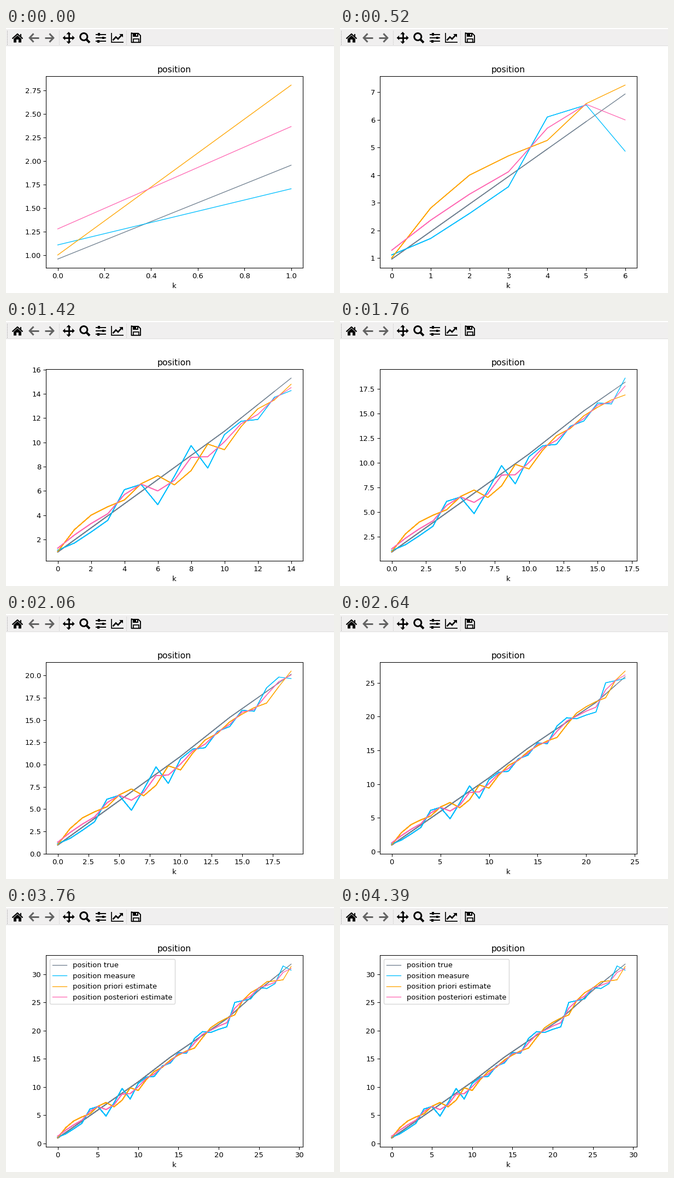
Recreate the animation shown at these times as a matplotlib script. Size 600 by 484 pixels, loop 4.79 s.

```python
import matplotlib.pyplot as plt
import numpy as np
from matplotlib.animation import FuncAnimation
from matplotlib.patches import Circle, Polygon, Rectangle

W, H, DPI = 600, 484, 100
LOOP_MS, FRAMES = 4790, 160
FRAMES_PER_STEP, HEAD_START, LEGEND_FRAME = 3.85, 3.75, 110
SCALE = 0.948  # the plot window is shown slightly reduced
LAST = 29

TRACK = {0: 0.96, 10: 10.92, 14: 15.3, 21: 22.08, 25: 27.15, 29: 31.78}
SPEED = {0: 1.526, 1: 1.634, 4: 0.89, 6: 0.5, 8: 1.1, 9: 0.58, 10: 1.25,
         14: 1.15, 15: 0.5, 19: 1.4, 24: 1.4, 27: 0.45, 28: 1.05}
SENSOR_NOISE = [0.15, -0.25, -0.34, -0.37, 1.16, 0.6, -2.07, -0.72, 0.81,
                -2.04, -0.28, -0.27, -1.22, -0.48, -1.03, -0.17, -1.25, 0.41,
                0.65, -0.48, -0.89, -1.42, 1.65, 0.69, -0.24, 0.45, -0.84,
                -1.14, 0.83, -1.08]


def through(points):
    return np.interp(range(LAST + 1), list(points), list(points.values()))


def estimate(measured, speed):
    """Predict each position from the last one, then correct it."""
    priori, posteriori = [1.003], [1.28]
    for k in range(1, LAST + 1):
        gain = 0.53 - 0.13 / k ** 2
        guess = posteriori[-1] + speed[k - 1]
        priori.append(guess)
        posteriori.append(guess + gain * (measured[k] - guess))
    return priori, posteriori


true = through(TRACK)
measured = true + SENSOR_NOISE
priori, posteriori = estimate(measured, through(SPEED))
SERIES = [
    ("position true", "slategray", true),
    ("position measure", "deepskyblue", measured),
    ("position priori estimate", "orange", priori),
    ("position posteriori estimate", "hotpink", posteriori),
]
VALUES = np.array([data for _, _, data in SERIES])

plt.rcParams.update({
    "toolbar": "None",
    "font.family": "DejaVu Sans",
    "font.size": 9.42,
    "axes.linewidth": 0.8 * SCALE,
    "axes.titlepad": 6 * SCALE,
    "axes.labelpad": 4 * SCALE,
    "lines.linewidth": SCALE,
    "patch.linewidth": SCALE,
})
for axis in ("xtick", "ytick"):
    plt.rcParams.update({
        f"{axis}.major.size": 3.5 * SCALE,
        f"{axis}.major.width": 0.8 * SCALE,
        f"{axis}.major.pad": 3.5 * SCALE,
    })

fig = plt.figure(figsize=(W / DPI, H / DPI), dpi=DPI, facecolor="white")

# Toolbar, drawn in pixel coordinates with y pointing down
bar = fig.add_axes([0, 0, 1, 1])
bar.set(xlim=(0, W), ylim=(H, 0))
bar.axis("off")
INK, FADED, PANEL = "black", "#626262", "#f0efef"


def stroke(points, width, color=INK, join="miter"):
    xs, ys = zip(*points)
    bar.plot(xs, ys, color=color, lw=width * 72 / DPI,
             solid_capstyle="butt", solid_joinstyle=join)


def fill(points, color=INK):
    bar.add_patch(Polygon(points, fc=color, lw=0))


def box(x0, y0, x1, y1, color=INK):
    bar.add_patch(Rectangle((x0, y0), x1 - x0, y1 - y0, fc=color, lw=0))


def dotted(x, color):
    for y in range(5, 31, 3):
        box(x, y, x + 1, y + 1.5, color)


def home_icon():
    stroke([(11.5, 19.5), (21, 11), (30.5, 19.5)], 2.2)
    box(25.5, 10.5, 28.3, 16)
    fill([(14, 19.8), (21, 13.6), (28, 19.8), (28, 26.5), (23, 26.5),
          (23, 21), (19, 21), (19, 26.5), (14, 26.5)])


def arrow_icon(tip, direction):
    stroke([(tip + direction * 9.5, 10.3), (tip + direction * 2.2, 18),
            (tip + direction * 9.5, 25.7)], 3, FADED)
    stroke([(tip + direction * 2.5, 18), (tip + direction * 18.5, 18)],
           3, FADED)


def move_icon(cx, cy):
    for dx, dy in ((1, 0), (-1, 0), (0, 1), (0, -1)):
        stroke([(cx, cy), (cx + 8 * dx, cy + 8 * dy)], 2.8)
        base_x, base_y = cx + 6.5 * dx, cy + 6.5 * dy
        fill([(cx + 11 * dx, cy + 11 * dy),
              (base_x + 4.3 * dy, base_y + 4.3 * dx),
              (base_x - 4.3 * dy, base_y - 4.3 * dx)])


def zoom_icon():
    bar.add_patch(Circle((142.3, 16), 6.5, fill=False, ec=INK,
                         lw=3 * 72 / DPI))
    stroke([(146.8, 20.5), (153, 26.7)], 4)


def sliders_icon():
    for y, knob in ((11.8, 170), (18, 178), (24.2, 169)):
        stroke([(163.5, y), (183, y)], 1.9)
        box(knob - 3, y - 2.5, knob + 3, y + 2.5, PANEL)
        box(knob - 2, y - 2.4, knob + 2, y + 2.4)


def chart_icon():
    stroke([(192.8, 9), (192.8, 26.3), (215, 26.3)], 1.7)
    stroke([(195.5, 22.5), (201, 16.5), (205, 20), (211.5, 13)], 2.7)
    fill([(207, 10.5), (213.8, 10.5), (213.8, 17.3)])


def save_icon():
    stroke([(229.5, 9.8), (242, 9.8), (246, 13.8), (246, 26.2),
            (229.5, 26.2), (229.5, 9), (231, 9.8)], 1.9, join="round")
    box(232, 10, 241.5, 15.8)
    box(237.5, 10.8, 239.8, 14.3, PANEL)
    stroke([(233, 26), (233, 20.2), (242.5, 20.2), (242.5, 26)], 1.7)


box(0, 2, W, 32, PANEL)
box(0, 32, W, 33, "#dedede")
dotted(2, "#b4b4b4")
dotted(97, "#d2d2d2")
dotted(220, "#d2d2d2")
home_icon()
arrow_icon(41, 1)
arrow_icon(89, -1)
move_icon(114.7, 18)
zoom_icon()
sliders_icon()
chart_icon()
save_icon()

# Plot
LEFT, RIGHT, TOP, BOTTOM = 73.3, 542.9, 88.4, 437.9
ax = fig.add_axes([LEFT / W, 1 - BOTTOM / H,
                   (RIGHT - LEFT) / W, (BOTTOM - TOP) / H])
ax.set_title("position", fontsize=12 * SCALE)
ax.set_xlabel("k")

# Every step plots the whole history again, so older segments look heavier
layers = [[ax.plot(range(k + 1), data[:k + 1], color=color, label=name)[0]
           for name, color, data in SERIES]
          for k in range(1, LAST + 1)]
legend = ax.legend(handles=layers[-1], loc="upper left")


def padded(low, high):
    margin = 0.05 * (high - low)
    return low - margin, high + margin


def update(frame):
    k = min(LAST, 1 + int((frame + HEAD_START) / FRAMES_PER_STEP))
    for step, lines in enumerate(layers, start=1):
        for line in lines:
            line.set_visible(step <= k)
    shown = VALUES[:, :k + 1]
    ax.set_xlim(padded(0, k))
    ax.set_ylim(padded(shown.min(), shown.max()))
    legend.set_visible(frame >= LEGEND_FRAME)
    return []


anim = FuncAnimation(fig, update, frames=FRAMES, interval=LOOP_MS / FRAMES,
                     init_func=lambda: update(0), repeat=True, repeat_delay=0)
plt.show()
```
